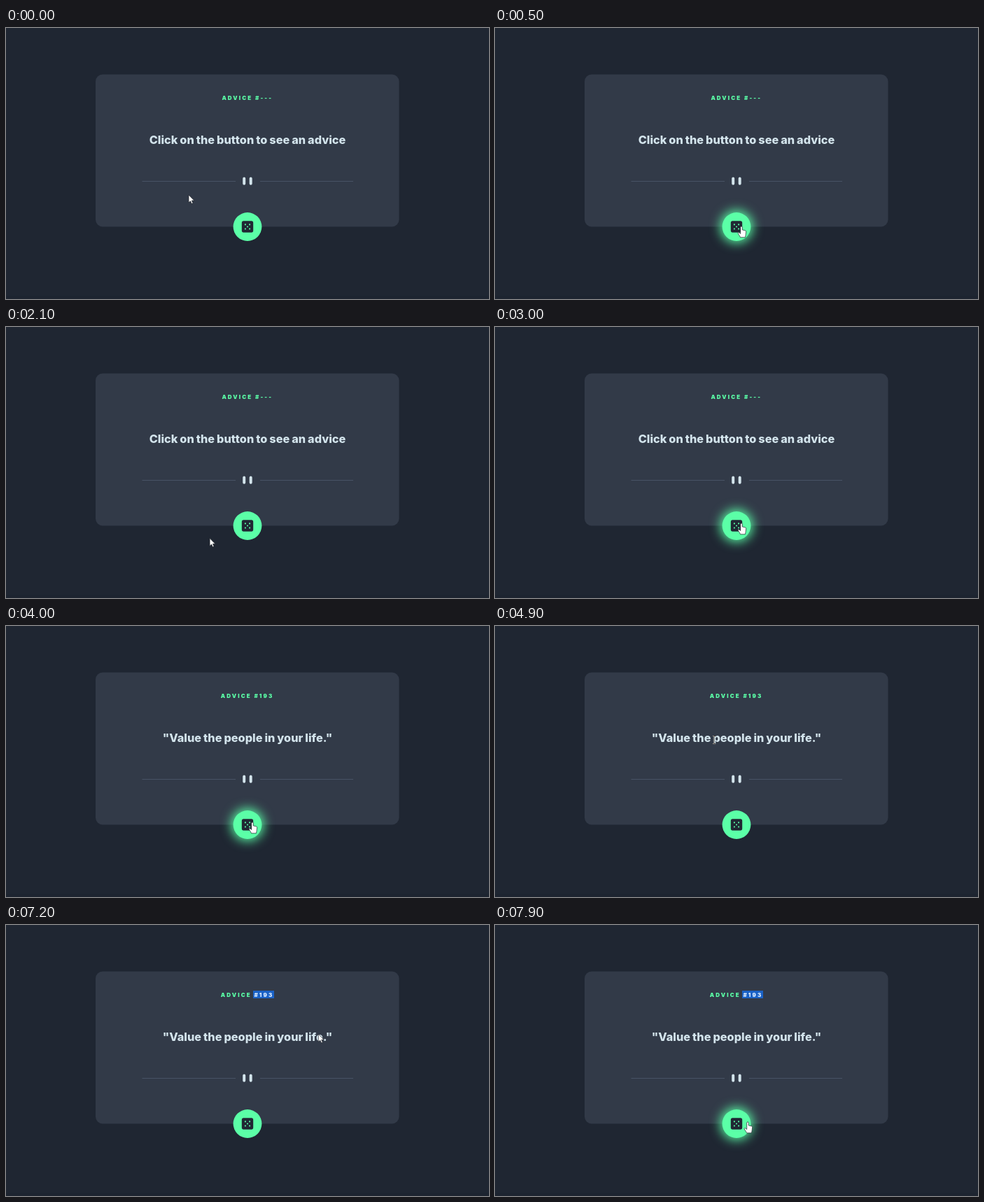
Animation, 690 px wide and 388 px high, one loop 8000 ms. Source, as an HTML page:

```html
<!DOCTYPE html>
<html lang="en">
<head>
<meta charset="utf-8">
<title>Advice generator</title>
<style>
  html, body { margin: 0; width: 100%; height: 100%; overflow: hidden; background: #1f2632; }
  svg { display: block; width: 100%; height: 100%; }
  text { font-family: Inter, "Open Sans", sans-serif; white-space: pre; }
  #label { font-size: 8px; font-weight: 900; letter-spacing: 2.1px; fill: #5bffa7; }
  #quote { font-size: 16.3px; font-weight: 800; word-spacing: -.6px; text-anchor: middle; fill: #d3e4ec; }
  #glow { fill: #5bffa7; filter: blur(8px); }
  #arrow, #hand { fill: #fff; stroke: #20242c; stroke-width: .7; stroke-linejoin: round; }
  #beam { fill: none; stroke: #fff; stroke-width: .8; mix-blend-mode: difference; }
</style>
</head>
<body>
<svg viewBox="0 0 690 388">
  <rect width="690" height="388" fill="#1f2632"/>
  <rect y="383.5" width="690" height="4.5" fill="#1d2430"/>
  <rect x="128" y="66.5" width="433.5" height="218" rx="10" fill="#323a48"/>

  <rect id="selection" y="94" height="11" fill="#1b62c6"/>
  <text id="label" y="102.5">ADVICE <tspan id="number"></tspan></text>
  <text id="quote" x="345" y="166.4"></text>

  <path d="M194.5 219.5H328M363 219.5H496" stroke="#4f5a6c" stroke-width=".8"/>
  <path d="M340.2 215.5v7.2M349.7 215.5v7.2" stroke="#d3e4ec" stroke-width="4" stroke-linecap="round"/>

  <g transform="translate(345 284.5)">
    <circle id="glow" r="23"/>
    <circle r="20.4" fill="#5bffa7"/>
    <rect x="-8.2" y="-8.2" width="16.4" height="16.4" rx="2.6" fill="#202733"/>
    <path d="M0 0h0M-3.1-3.1h0M3.1-3.1h0M-3.1 3.1h0M3.1 3.1h0"
          stroke="#5bffa7" stroke-width="2.1" stroke-linecap="round"/>
  </g>

  <g id="cursor">
    <path id="arrow" d="M0 0V11L2.5 8.8 4.2 12.6 6 11.8 4.4 8.1H7.8Z"/>
    <path id="hand" d="M-1.3 1.3a1.3 1.3 0 0 1 2.6 0V5l4.2 1q1.4.4 1.2 1.8l-.5 4q-.2 1.6-.8 4H-1.5q-.6-2-2.2-3.8l-1.2-2.4q.4-1.5 1.8-.5l1.8 1.5Z"/>
    <path id="beam" d="M-2-5.5h4M0-5.5v11M-2 5.5h4"/>
  </g>
</svg>
<script>
const LOOP = 8000, STEP = 100;
const NEW_ADVICE = 3900, SELECT_START = 6500, SELECT_END = 6700;
const $ = id => document.getElementById(id);

const start = { x: 261, y: 239 };
const moves = [
  { from: 0, to: 500, x: 352, y: 284 },      // onto the button
  { from: 800, to: 1100, x: 492, y: 310 },   // away and back
  { from: 1200, to: 1500, x: 352, y: 286 },
  { from: 1900, to: 2300, x: 278, y: 306 },  // away and back, then click
  { from: 2400, to: 2800, x: 352, y: 281 },
  { from: 4200, to: 4600, x: 664, y: 300 },  // across the quote
  { from: 4600, to: 4900, x: 313, y: 163 },
  { from: 4900, to: 5300, x: 322, y: 286 },
  { from: 5600, to: 6400, x: 390, y: 98.5 }, // select the number
  { from: SELECT_START, to: SELECT_END, x: 363, y: 100 },
  { from: 7000, to: 7300, x: 452, y: 160 },
  { from: 7500, to: 7900, x: 361, y: 282 }   // return to the button
];

const progress = (t, from, to) => Math.min(1, Math.max(0, (t - from) / (to - from)));
const easeOut = p => 1 - (1 - p) ** 2.5;
const mix = (a, b, k) => a + (b - a) * k;

function pointerAt(t) {
  return moves.reduce((point, move) => {
    const k = easeOut(progress(t, move.from, move.to));
    return { x: mix(point.x, move.x, k), y: mix(point.y, move.y, k) };
  }, start);
}

const near = (p, x, y, halfWidth, halfHeight) =>
  Math.abs(p.x - x) < halfWidth && Math.abs(p.y - y) < halfHeight;

function pointerShape(p) {
  if (Math.hypot(p.x - 345, p.y - 284.5) < 20.4) return "hand";
  return near(p, 345, 161, 120, 13) || near(p, 345, 100, 38, 6) ? "beam" : "arrow";
}

const show = (id, on) => $(id).setAttribute("display", on ? "inline" : "none");

function render(t) {
  const { x, y } = pointerAt(t);
  // Hover feedback trails the pointer by one step
  const shape = pointerShape(pointerAt(t - STEP));
  $("cursor").setAttribute("transform", `translate(${x} ${y})`);
  for (const id of ["arrow", "hand", "beam"]) show(id, id === shape);
  show("glow", shape === "hand");

  const loaded = t >= NEW_ADVICE;
  $("number").textContent = loaded ? "#193" : "#---";
  $("quote").textContent = loaded ? '"Value the people in your life."' : "Click on the button to see an advice";
  $("label").setAttribute("x", loaded ? 306.8 : 308.4);

  const selected = progress(t, SELECT_START, SELECT_END);
  $("selection").setAttribute("x", 383 - 30 * selected);
  $("selection").setAttribute("width", 30 * selected);
  $("number").setAttribute("fill", selected === 1 ? "#d9eaff" : "#5bffa7");
}

function tick() {
  const t = performance.now() % LOOP;
  render(Math.floor(t / STEP) * STEP);
  requestAnimationFrame(tick);
}
tick();
</script>
</body>
</html>
```
